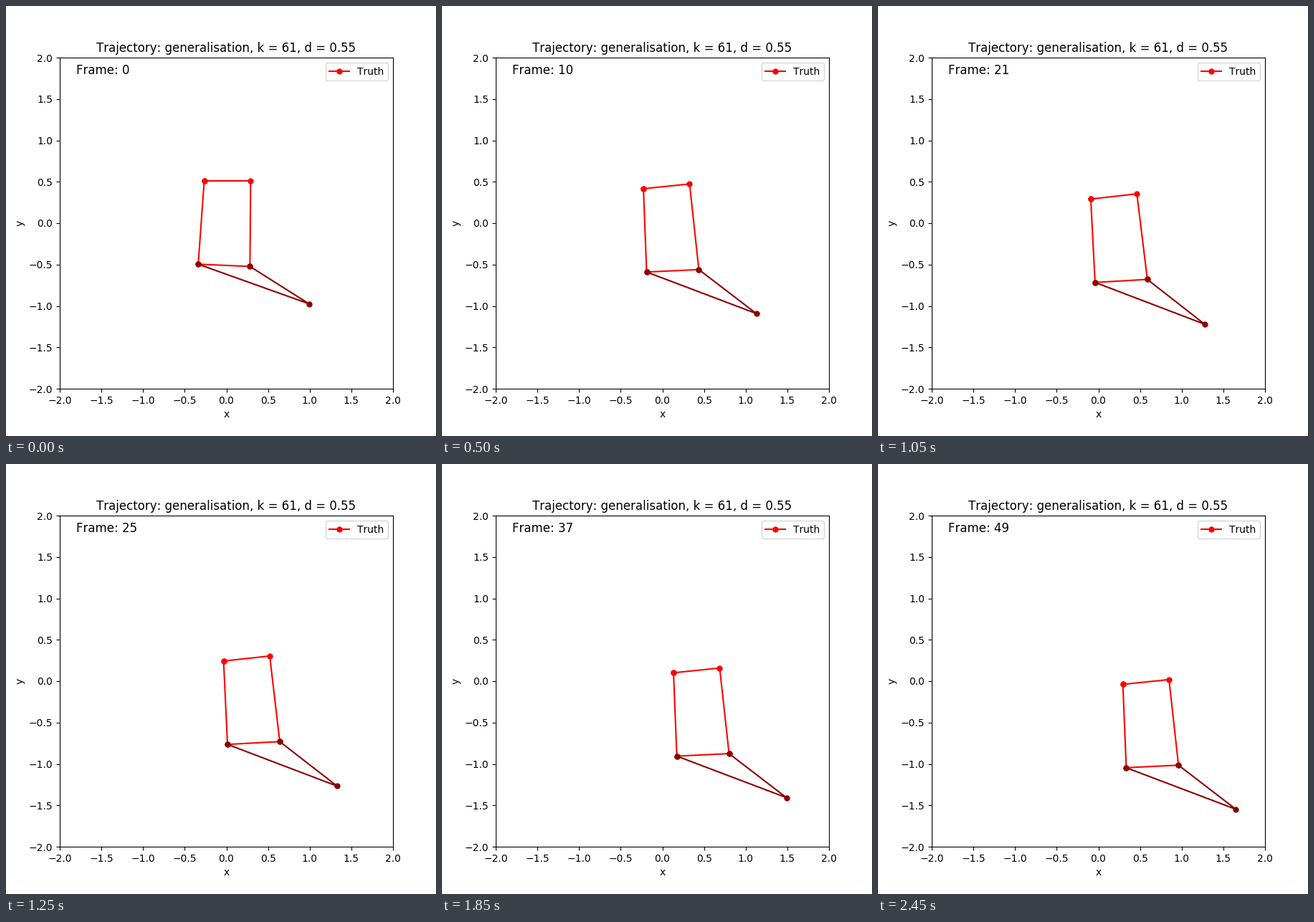
Animation, 600 px wide and 600 px high, one loop 2.5 s. Source, as a matplotlib script:

```python
import numpy as np
import matplotlib.pyplot as plt
from matplotlib.animation import FuncAnimation

FRAMES = 50
INTERVAL = 50

# Settled shape: top left, top right, bottom right, bottom left, tail
SHAPE = np.array([(-0.364, 0.534), (0.190, 0.592), (0.304, -0.442),
                  (-0.323, -0.473), (0.993, -0.975)])
# Initial displacement of each node, which swings out as the shape settles
STRETCH = np.array([(0.098, -0.023), (0.101, -0.081), (-0.021, -0.081),
                    (-0.015, -0.023), (0, 0)])
DRIFT = np.array([0.01342, -0.01169])
DECAY = 9
SWING = 0.15


def pose(step):
    """Steady drift plus a damped swing."""
    ring = np.exp(-step / DECAY) * np.cos(SWING * step)
    return SHAPE + DRIFT * step + STRETCH * ring


plt.rcParams["text.kerning_factor"] = 6
plt.rcParams["lines.markersize"] = 5

fig, ax = plt.subplots(figsize=(6, 6), dpi=100)
ax.set(xlim=(-2, 2), ylim=(-2, 2), xlabel="x", ylabel="y",
       title="Trajectory: generalisation, k = 61, d = 0.55")

body, = ax.plot([], [], "o-", color="red", label="Truth")
tail, = ax.plot([], [], "o-", color="darkred")
counter = ax.text(-1.8, 1.8, "", fontsize=12)
ax.legend(loc="upper right")


def update(step):
    p = pose(step)
    body.set_data(*p[[0, 1, 2, 3, 0]].T)
    tail.set_data(*p[[3, 4, 2]].T)
    counter.set_text(f"Frame: {step}")
    return body, tail, counter


anim = FuncAnimation(fig, update, frames=FRAMES, interval=INTERVAL,
                     repeat=True, repeat_delay=0)
plt.show()
```
